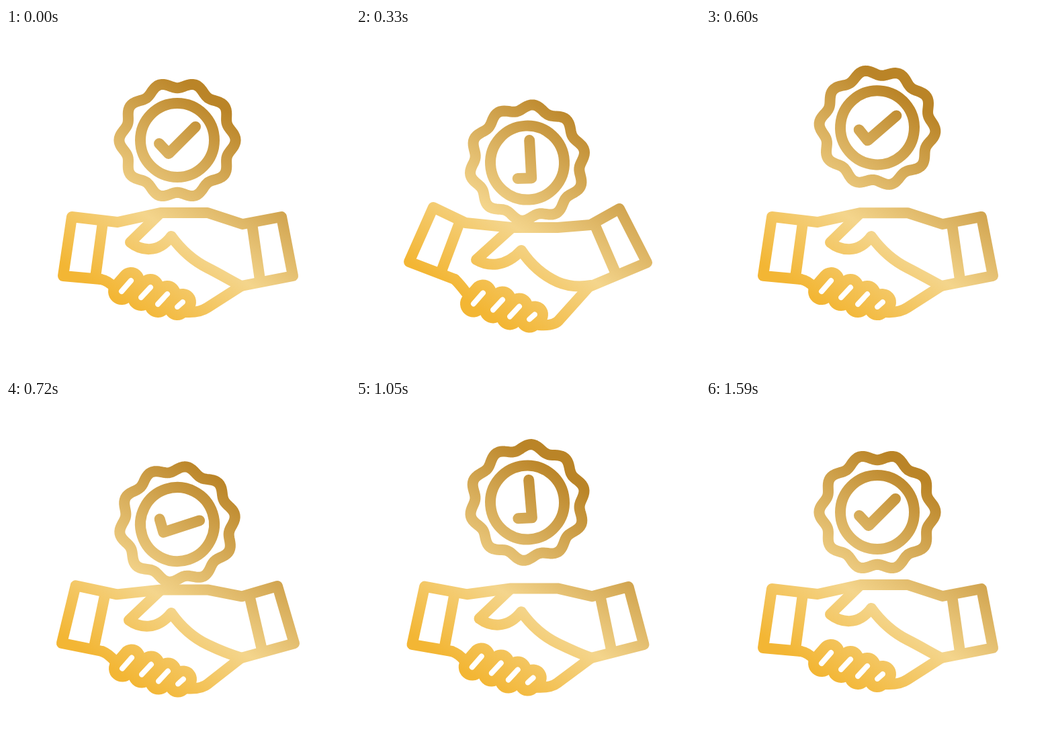
These frames come from a looping animation (512x512 px, 1800 ms). An HTML page with a canvas:

```html
<!DOCTYPE html>
<html lang="en">
<head>
<meta charset="utf-8">
<title>Handshake seal</title>
<style>
html, body { margin: 0; width: 100%; height: 100%; overflow: hidden; background: #fff; }
canvas { display: block; width: 512px; height: 512px; }
</style>
</head>
<body>
<canvas id="stage" width="512" height="512"></canvas>
<script>
const ctx = document.getElementById('stage').getContext('2d');
const LOOP = 1800, STEP = 30;

// Tracks: [time, value] keys, eased in and out between neighbours.
const shake = [[0, 0], [300, 1.02], [615, 0], [885, 1.02], [1130, 0]];
const badgeY = [[0, 167], [300, 203], [535, 141], [825, 203], [1065, 152], [1350, 179], [1590, 167]];
const badgeTurn = [[0, 0], [390, -51], [720, 27], [1060, -50], [1340, 0]];

// Each line: resting pose, then lowered pose with the same commands.
const lines = [
  ['M141 374 L85 369 L98 281 L166 289 L230 275 L300 275 L352 292 L410 281 L427 369 L350 384',
   'M147 374 L79 348 L115 267 L163 290 L232 297 L300 297 L349 293 L392 269 L433 349 L350 384'],
  ['M141 374 Q152 376 161 386', 'M147 374 Q155 382 164 394'],
  ['M144 289 L133 371', 'M154 290 L127 362'],
  ['M366 291 L378 375', 'M355 292 L387 366'],
  ['M228 277 L185 319 C200 331 226 337 246 310 C262 332 280 347 300 357 C316 365 333 375 350 384',
   'M232 297 L179 345 C196 355 222 357 246 331 C260 352 278 368 300 378 C314 384 332 386 350 383'],
  ['M350 384 L300 416 Q288 424 268 423', 'M346 386 L303 434 Q296 444 272 442']
];
const fingers = [[172, 392, 186, 376], [201, 401, 215, 386], [226, 411, 240, 396], [255, 415, 263, 408]];

const gold = ctx.createLinearGradient(300, 104, 118, 374);
gold.addColorStop(0, '#ba8427');
gold.addColorStop(0.6, '#f4d58c');
gold.addColorStop(1, '#f3b634');

function valueAt(keys, t) {
  const i = keys.findIndex(k => k[0] > t);
  if (i < 0) return keys[keys.length - 1][1];
  const [t0, a] = keys[i - 1], [t1, b] = keys[i];
  return a + (b - a) * (1 - Math.cos(Math.PI * (t - t0) / (t1 - t0))) / 2;
}

function blend(from, to, k) {
  const ends = to.match(/\d+/g);
  let i = 0;
  return from.replace(/\d+/g, n => (+n + (ends[i++] - n) * k).toFixed(2));
}

function drawFinger([x0, y0, x1, y1]) {
  const a = Math.atan2(y1 - y0, x1 - x0), q = Math.PI / 2;
  ctx.beginPath();
  ctx.arc(x0, y0, 12, a + q, a + 3 * q);
  ctx.arc(x1, y1, 12, a - q, a + q);
  ctx.closePath();
  ctx.stroke();
}

function drawHands(t) {
  const p = valueAt(shake, t);
  for (const [rest, low] of lines) ctx.stroke(new Path2D(blend(rest, low, p)));
  ctx.save();
  // The second shake drops the fingers a little deeper.
  ctx.translate(3 * p, (t < 615 ? 18.5 : 22.5) * p);
  fingers.forEach(drawFinger);
  ctx.restore();
}

function drawBadge(t) {
  ctx.save();
  ctx.translate(255, valueAt(badgeY, t));
  ctx.rotate(valueAt(badgeTurn, t) * Math.PI / 180);
  ctx.beginPath();
  for (let i = 0; i < 180; i++) {
    const a = i * Math.PI / 90, r = 82.2 + 4.4 * Math.cos(10 * a);
    ctx.lineTo(r * Math.cos(a), r * Math.sin(a));
  }
  ctx.closePath();
  ctx.moveTo(55, 0);
  ctx.arc(0, 0, 55, 0, 2 * Math.PI);
  ctx.moveTo(-27, 5);
  ctx.lineTo(-13, 20);
  ctx.lineTo(27, -20);
  ctx.stroke();
  ctx.restore();
}

function frame(now) {
  const t = Math.floor(now % LOOP / STEP) * STEP;
  ctx.globalCompositeOperation = 'source-over';
  ctx.clearRect(0, 0, 512, 512);
  ctx.lineWidth = 16;
  ctx.lineCap = ctx.lineJoin = 'round';
  drawHands(t);
  drawBadge(t);
  // Tint everything with one gradient fixed to the stage.
  ctx.globalCompositeOperation = 'source-in';
  ctx.fillStyle = gold;
  ctx.fillRect(0, 0, 512, 512);
  requestAnimationFrame(frame);
}
requestAnimationFrame(frame);
</script>
</body>
</html>
```
